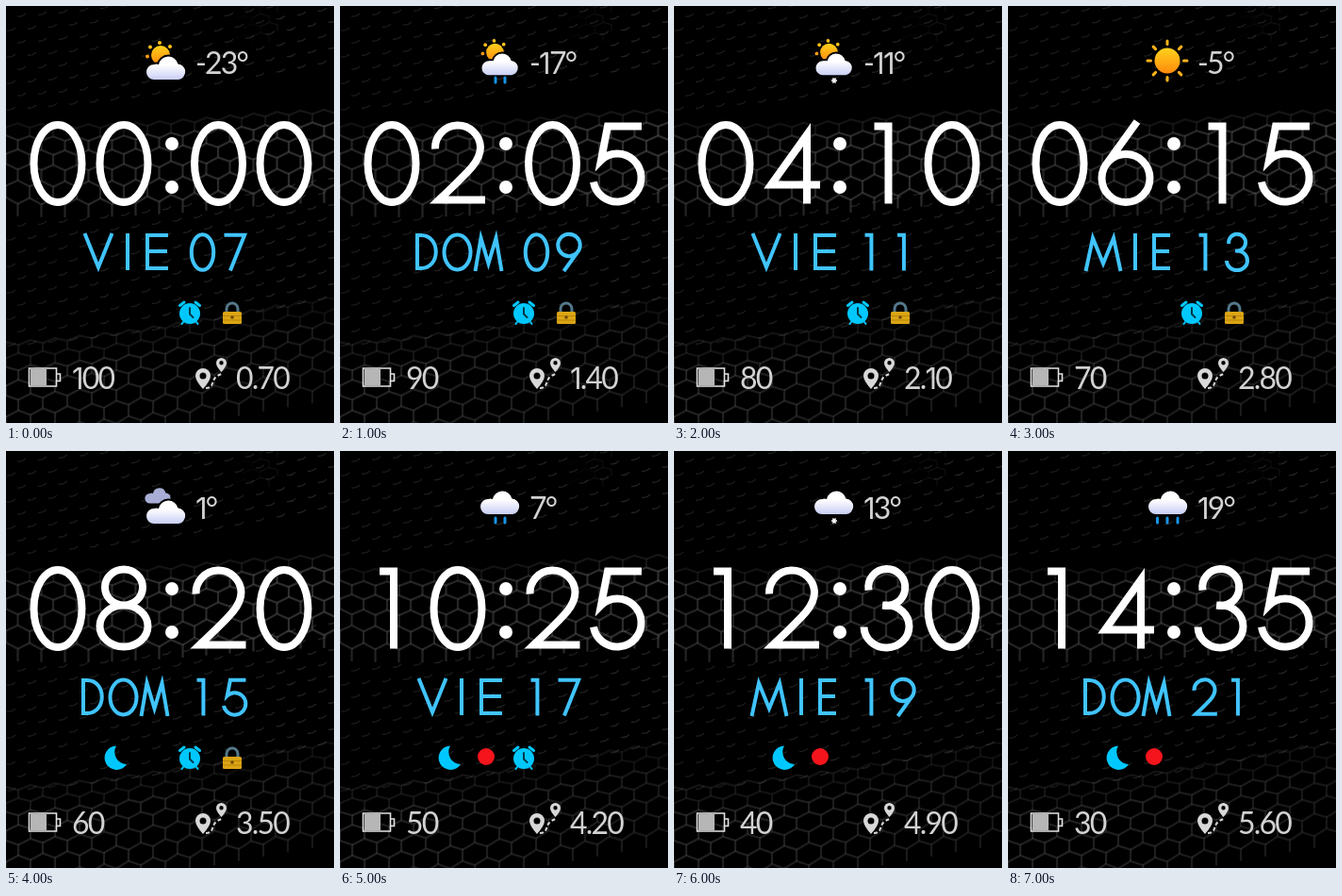
An HTML page with a canvas that plays this animation: 348x442 px, repeating every 8000 ms.

```html
<!DOCTYPE html>
<html lang="es">
<head>
<meta charset="utf-8">
<title>Watch face</title>
<style>
  html, body { margin: 0; width: 100%; height: 100%; overflow: hidden; background: #000; }
  canvas, svg { position: absolute; left: 0; top: 0; width: 348px; height: 442px; }
  .lettering path { fill: none; stroke-miterlimit: 6; vector-effect: non-scaling-stroke; }
  #clock { stroke: #fff; stroke-width: 8; }
  #date { stroke: #40c4ff; stroke-width: 4; }
  text { font: 400 32px Lato, sans-serif; letter-spacing: -1.8px; fill: #d2d2d2; }
  .one { font: 400 31px Inter, sans-serif; }
</style>
</head>
<body>
<canvas id="mesh" width="348" height="442"></canvas>
<svg viewBox="0 0 348 442">
  <defs>
    <linearGradient id="white" gradientUnits="userSpaceOnUse" x1="0" y1="52" x2="0" y2="78">
      <stop offset=".4" stop-color="#fff"/><stop offset="1" stop-color="#c9cef4"/>
    </linearGradient>
    <linearGradient id="gold" x1="0" y1="0" x2="0" y2="1">
      <stop offset="0" stop-color="#ffd21c"/><stop offset="1" stop-color="#ff8a0c"/>
    </linearGradient>
    <path id="cloud" d="M157 78A8 8 0 0 1 157 62Q160 61 162 62A10.5 10.5 0 0 1 182.500 61.500A8.300 8.300 0 0 1 183 78Z"/>
    <g id="sunCloud">
      <circle cx="164" cy="52" r="10" fill="url(#gold)"/>
      <g fill="#ffc21a">
        <circle cx="150" cy="53.500" r="2" fill="#ff9a10"/><circle cx="153" cy="43.500" r="2"/>
        <circle cx="163" cy="39" r="2"/><circle cx="174" cy="43" r="2"/>
      </g>
      <use href="#cloud" fill="url(#white)" stroke="#000" stroke-width="4" paint-order="stroke"/>
    </g>
    <path id="flake" d="M-3 0H3M-1.500-2.600L1.500 2.600M1.500-2.600L-1.500 2.600" stroke="#fff" stroke-width="1.500"/>
  </defs>

  <g id="weather"></g>
  <text id="temp" x="201" y="72"></text>

  <g class="lettering">
    <g id="clock"></g>
    <g id="date"></g>
  </g>
  <g fill="#fff"><circle cx="176" cy="146" r="7"/><circle cx="176" cy="192" r="7"/></g>

  <path id="moon" fill="#00c8ff" d="M117 312.500A12.700 12.700 0 1 0 128 332A13 13 0 0 1 117 312.500Z"/>
  <circle id="link" cx="155" cy="324" r="9" fill="#f5141c"/>
  <g id="alarm" fill="none" stroke="#00c8ff" stroke-width="3" stroke-linecap="round">
    <circle cx="195" cy="326" r="11" fill="#00c8ff" stroke="none"/>
    <path d="M184.500 317.500L189 314M205.500 317.500L201 314"/>
    <path d="M188 335L186.500 337M202 335L203.500 337" stroke-width="2"/>
    <path d="M195 320V326.500L198.500 330" stroke="#053848" stroke-width="2"/>
  </g>
  <g id="lock">
    <path d="M234 326V321A6 6 0 0 1 246 321V326" fill="none" stroke="#54788a" stroke-width="3"/>
    <rect x="230" y="324" width="20" height="13" rx="1.500" fill="#dba514"/>
    <path d="M230 328.500H250M230 333H250" stroke="#b9860c"/>
    <circle cx="240" cy="330" r="1.800" fill="#704c08"/>
  </g>

  <g fill="#d8d8d8">
    <path d="M24.500 384H53.500V403H24.500ZM54 390H57.500V397.500H54" fill="none" stroke="#e4e4e4" stroke-width="1.600"/>
    <rect x="26" y="385" width="17" height="17" fill="#b6b6b6"/>
    <path fill-rule="evenodd" d="M209 406Q201 397 201 392A8 8 0 0 1 217 392Q217 397 209 406ZM209 388.500A3.500 3.500 0 1 0 209 395.500A3.500 3.500 0 1 0 209 388.500Z"/>
    <path fill-rule="evenodd" d="M228.500 388Q223 382 223 378.500A5.500 5.500 0 0 1 234 378.500Q234 382 228.500 388ZM228.500 376A2.200 2.200 0 1 0 228.500 380.400A2.200 2.200 0 1 0 228.500 376Z"/>
    <path d="M212 405C224 404 214 395 229 390" fill="none" stroke="#d8d8d8" stroke-width="2" stroke-dasharray="4 2.500"/>
  </g>
  <text id="battery" x="70" y="406"></text>
  <text id="distance" x="244" y="406"></text>
</svg>
<script>
const $ = id => document.getElementById(id);
const STEP = 1000, COUNT = 8;

// Single-line numerals: centred on x = 0, 86 units tall.
const ellipse = (cy, rx, ry) =>
  `M${-rx} ${cy}a${rx} ${ry} 0 1 1 ${2 * rx} 0a${rx} ${ry} 0 1 1 ${-2 * rx} 0`;
const DIGITS = [
  ellipse(43.5, 25.5, 41),
  'M-13 4H2V86',
  'M-24 28A24 24 0 0 1 24 26C24 40 16 48 -20 82H29',
  'M-19 24A19.5 19.5 0 1 1 -4 40H0A24 22.5 0 1 1 -24 63',
  'M30 66H-22L16 13V86',
  'M25 4H-11L-18 40C-13 35 -6 33 -1 33A25.5 25.5 0 1 1 -26 63',
  'M12 -1L-22 46' + ellipse(59, 25.5, 25.5),
  'M-25 4H22L-11 86',
  ellipse(21, 20, 19) + ellipse(62, 25.5, 22),
  'M-12 87L22 40' + ellipse(27, 25.5, 25.5)
];
const DAYS = {
  VIE: 'M83.5 241L98 277L112.5 241M129 241V280M172 243H150V278H172M150 260H171',
  MIE: 'M82.5 281L90 246L101 273L112 246L119.5 281M135 241V280M172 243H155V278H172M155 260H171',
  DOM: 'M82 243V278H86C107 278 107 243 86 243Z' +
       'M110.5 261A14 18.5 0 0 1 138.5 261A14 18.5 0 0 1 110.5 261' +
       'M143.500 281L149.500 246L157.500 273L165.500 246L171.500 281'
};
const WEEK = ['VIE', 'DOM', 'VIE', 'MIE', 'DOM', 'VIE', 'MIE', 'DOM'];

const pad = n => String(n).padStart(2, '0');
const digits = (str, xs, y, scale) => [...str].map((d, k) =>
  `<path d="${DIGITS[d]}" transform="translate(${xs[k]} ${y}) scale(${scale})"/>`).join('');
const label = str => str.replace(/1/g, '<tspan class="one">1</tspan>');

// Weather icons
const drops = (xs, y) =>
  `<path d="${xs.map(x => `M${x} ${y}v5`).join('')}" stroke="#1994e6" stroke-width="3" stroke-linecap="round"/>`;
const flake = (x, y) => `<use href="#flake" x="${x}" y="${y}"/>`;
const smallSun = '<use href="#sunCloud" transform="translate(11.9 .7) scale(.93)"/>';
const highCloud = '<use href="#cloud" y="-11" fill="url(#white)"/>';
const rays = [...Array(8).keys()].map(k =>
  `<path d="M169 40.500V37" transform="rotate(${k * 45} 169 58)"/>`).join('');
const WEATHER = [
  '<use href="#sunCloud"/>',
  smallSun + drops([165, 175], 76),
  smallSun + flake(170, 79),
  `<circle cx="169" cy="58" r="13.500" fill="url(#gold)"/>
   <g stroke="#ffb31a" stroke-width="3" stroke-linecap="round">${rays}</g>`,
  `<use href="#cloud" fill="#a9aed6" transform="translate(49 4) scale(.66)"/>
   <use href="#cloud" y="-1" fill="url(#white)" stroke="#000" stroke-width="4" paint-order="stroke"/>`,
  highCloud + drops([165, 175], 71),
  highCloud + flake(170, 74),
  highCloud + drops([158.5, 169, 180], 71)
];

function show(i) {
  $('weather').innerHTML = WEATHER[i];
  $('temp').innerHTML = label(`${6 * i - 23}°`);
  $('clock').innerHTML = digits(pad(2 * i) + pad(5 * i), [55, 125, 225.5, 295], 123.5, 1);
  $('date').innerHTML = `<path d="${DAYS[WEEK[i]]}"/>` + digits(pad(7 + 2 * i), [208.5, 243], 241, .46);
  $('battery').innerHTML = label(String(100 - 10 * i));
  $('distance').innerHTML = label((.7 * (i + 1)).toFixed(2));
  const visible = { moon: i >= 4, link: i >= 5, alarm: i < 6, lock: i < 5 };
  for (const id in visible) $(id).style.display = visible[id] ? '' : 'none';
}

// Backdrop: two bands of honeycomb with rows of dashes between them.
const ctx = $('mesh').getContext('2d');
const gray = (x, a) => `rgba(110,110,110,${a * (.75 + .25 * x / 348)})`;

function honeycomb(rows, p, h, warp, alpha) {
  for (let j = 0; j < rows; j++) {
    for (let i = -1; i < 16; i++) {
      const x = i * p + (j % 2) * p / 2, y = j * h;
      ctx.strokeStyle = gray(x, alpha(x, j));
      ctx.beginPath();
      for (const [dx, dy] of [[-p / 2, h / 3], [0, h * 2 / 3], [p / 2, h / 3], [p / 2, -h / 3]])
        ctx.lineTo(x + dx, warp(x + dx, y + dy));
      ctx.stroke();
    }
  }
}

function dashes(top, bottom, gap) {
  for (let y = top, j = 0; y < bottom; y += gap, j++) {
    for (let x = -10 + (j % 2) * 11; x < 360; x += 22) {
      const cy = y - .14 * x + 5 * Math.sin(x / 90);
      ctx.strokeStyle = gray(x, .32);
      ctx.beginPath();
      ctx.moveTo(x, cy);
      ctx.quadraticCurveTo(x + 5, cy + 1, x + 9, cy - 3);
      ctx.stroke();
    }
  }
}

ctx.fillStyle = '#000';
ctx.fillRect(0, 0, 348, 442);
ctx.lineWidth = 1.3;
dashes(12, 122, 14);
dashes(234, 362, 14);
ctx.lineWidth = 2.2;
honeycomb(6, 25, 20, (x, y) => 216 - y * (1 - y / 600) - .03 * x + 4 * Math.sin(x / 70),
  (x, j) => j < 5 ? .42 : .2);
honeycomb(7, 26, 19, (x, y) => 460 - y * (1 - y / 700) - .13 * x + 4 * Math.sin(x / 80),
  (x, j) => (j < 5 ? .4 : .25) * (1 - x / 700));
ctx.lineWidth = 1.4;
honeycomb(4, 18, 10, (x, y) => 62 - y - .1 * x, x => x > 240 ? .4 * (x - 240) / 108 : 0);

let current = -1;
function tick() {
  const i = Math.floor(performance.now() / STEP) % COUNT;
  if (i !== current) show(current = i);
  requestAnimationFrame(tick);
}
tick();
</script>
</body>
</html>
```
